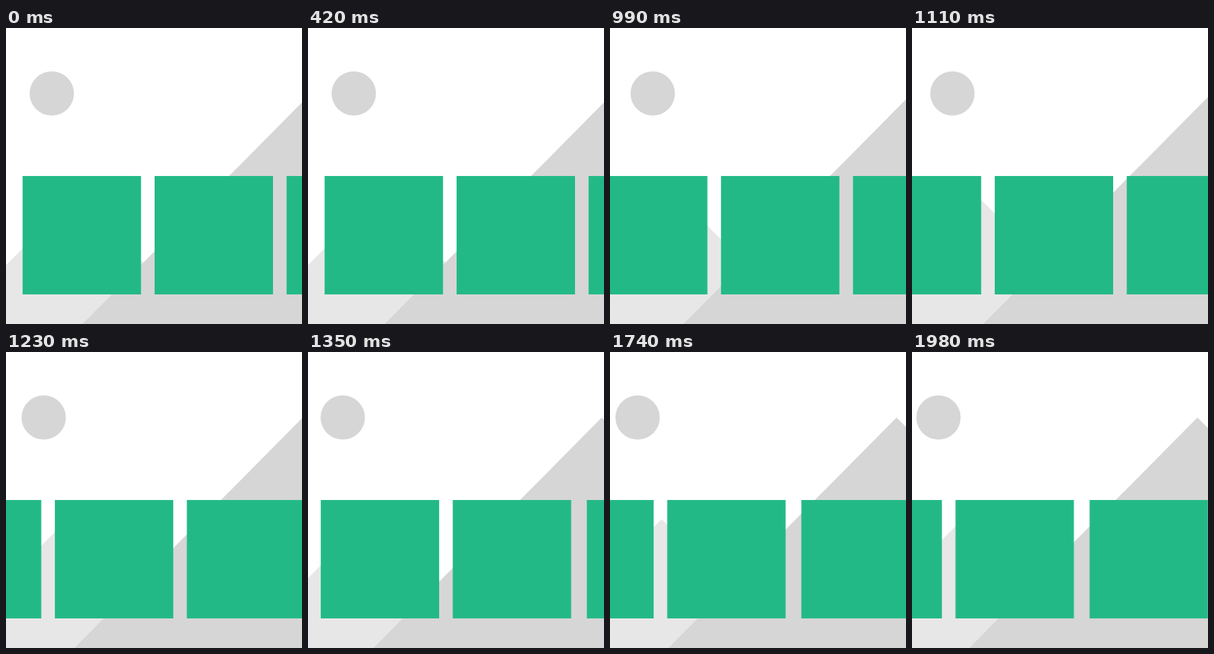
Write an HTML page that moves like this. It is 490 by 490 pixels and loops after 2.28 s.

```html
<!DOCTYPE html>
<html lang="en">
<head>
<meta charset="utf-8">
<title>Parallax cards</title>
<style>
  html, body {
    margin: 0;
    width: 100%;
    height: 100%;
    overflow: hidden;
    background: #fff;
  }
  svg {
    display: block;
    width: 100vw;
    height: 100vh;
  }
  .scenery { --shift: -32px; fill: #d6d6d6; }
  .cards { --shift: -392.5px; fill: #23b987; }
  .far { fill: #e7e7e7; }
  .scenery, .cards { animation: slide 2280ms infinite; }

  /* rest, slide from 617 to 1970 ms, rest, jump back */
  @keyframes slide {
    0% { transform: translateX(0); }
    27.06% { transform: translateX(0); animation-timing-function: ease-in-out; }
    86.4%, 100% { transform: translateX(var(--shift)); }
  }
</style>
</head>
<body>
<svg viewBox="0 0 490 490">
  <g class="scenery">
    <circle cx="75.8" cy="108.4" r="36.7"/>
    <path class="far" d="M115.7 276.8 l240 240 h-480 z"/>
    <path d="M504.5 108.4 l400 400 h-796 z"/>
  </g>
  <g class="cards">
    <rect x="27.5" y="245" width="196" height="196"/>
    <rect x="246" y="245" width="196" height="196"/>
    <rect x="464.5" y="245" width="196" height="196"/>
    <rect x="686.5" y="245" width="196" height="196"/>
  </g>
</svg>
</body>
</html>
```
